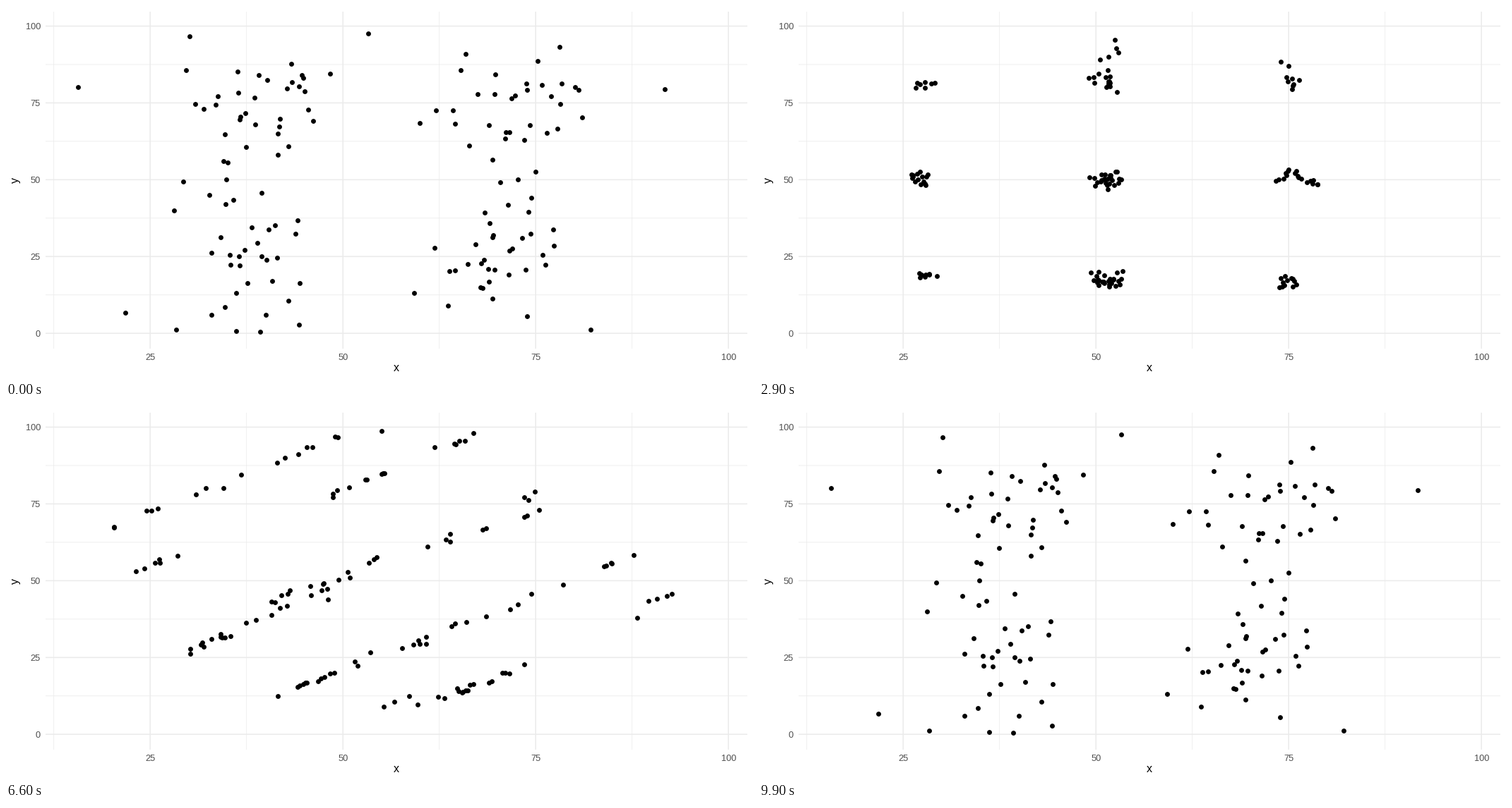
Write a matplotlib script that moves like this. It is 1058x529 px and loops after 10000 ms.

```python
import numpy as np
import matplotlib.pyplot as plt
from matplotlib.animation import FuncAnimation

W, H, DPI = 1058, 529, 100
FRAMES, INTERVAL = 100, 100
PX = 72 / DPI  # points per pixel
N = 142
CENTER = np.array([54.3, 47.8])

rng = np.random.default_rng(12)


def jitter(p, sx, sy):
    return p + rng.normal(size=p.shape).clip(-2, 2) * (sx, sy)


def nearest(v, levels):
    levels = np.asarray(levels)
    return levels[np.abs(v[:, None] - levels).argmin(1)]


def ellipse(cx, cy, rx, ry, angles):
    return np.c_[cx + rx * np.cos(angles), cy + ry * np.sin(angles)]


def spread(strokes, n):
    """n points evenly spaced along all strokes taken together."""
    strokes = [np.asarray(s, float) for s in strokes]
    a = np.vstack([s[:-1] for s in strokes])
    e = np.vstack([np.diff(s, axis=0) for s in strokes])
    size = np.hypot(e[:, 0], 0.6 * e[:, 1])
    ends = size.cumsum()
    s = (np.arange(n) + 0.5) / n * ends[-1]
    k = np.searchsorted(ends, s)
    return a[k] + e[k] * (1 - (ends[k] - s) / size[k])[:, None]


# The outline every other state is bent from.
OUTLINE = [
    [(55, 97), (43, 91), (35.6, 80), (26, 71), (22.3, 62), (24, 51)],
    [(26, 51), (40, 51.4), (56.7, 56), (61.8, 69)],
    [(57.4, 55), (48, 38), (35, 30), (30, 37), (38, 49)],
    [(30, 36), (30, 29), (36, 25), (44, 25.6), (55, 40.6), (68, 48), (71.5, 62), (69.5, 69.5)],
    [(58, 99.5), (68.5, 94), (83, 55), (98, 34)],
    [(56.7, 40.6), (64.4, 24)],
    [(74.4, 23), (63, 19), (45, 13.7)],
    [(48.7, 15), (56, 14)],
    [(52, 12.6), (46, 6)],
    [(50.5, 9.7), (78.2, 10.6)],
    [(68, 8.7), (68, 2.9)],
    ellipse(51.7, 81.5, 5, 4, np.linspace(0, 2 * np.pi, 13)),
]
base = spread(OUTLINE, N)
bx, by = base.T


def away():
    """Four loose clouds around an empty middle, with a few outliers."""
    far = [(15.6, 80.1), (91.7, 79.4), (21.8, 6.6), (82.1, 1.2),
           (30.1, 96.7), (53.3, 97.5), (78.1, 93.2)]
    p = list(far)
    while len(p) < N:
        sx, sy = (len(p) // 2 % 2) * 2 - 1, (len(p) % 2) * 2 - 1
        x, y = rng.normal(CENTER + (15.5 * sx, 24 * sy), (6.8, 12))
        clear = np.hypot((x - 56) / 14, (y - 48) / 17) > 1
        if clear and 28 < x < 81 and 0 < y < 91:
            p.append((x, y))
    return rng.permutation(np.array(p))


def rings(*radii):
    d = base - CENTER
    r = np.hypot(*d.T)
    goal = nearest(r, radii) + rng.uniform(-1.6, 1.6, N)
    return jitter(CENTER + d * (goal / r)[:, None], 0.5, 0.5)


def dots():
    y = nearest(by, [17.3, 50.5, 82]) + 2.1 * np.maximum(0, by - 93)
    return jitter(np.c_[nearest(bx, [26.8, 51.2, 75.7]), y], 0.6, 0.8)


def h_lines():
    return jitter(np.c_[bx, nearest(by, 10.5 + 19.9 * np.arange(5))], 1.5, 0.3)


def high_lines():
    mid = np.where(by > 50, 75, 25)
    return jitter(np.c_[bx, mid + 0.4 * (by - mid)], 1.8, 2)


def slant(sign):
    """Project onto five diagonals; sign +1 falls, -1 rises."""
    s = by + sign * bx
    levels = np.array([-50, -30, 0, 30, 50]) + (100 if sign > 0 else 0)
    move = (nearest(s, levels) - s) / 2
    along = rng.normal(0, 1.2, N)
    return jitter(np.c_[bx + sign * move + along, by + move - sign * along], 0.4, 0.4)


def star():
    """Nearest place on a five-pointed star, drawn out towards its tips."""
    turn = np.pi / 2 + np.arange(5) * 2 * np.pi / 5
    tips = ellipse(58, 50, 31.5, 42, turn)
    dents = ellipse(58, 50, 14, 19, turn + np.pi / 5)
    a = np.vstack([tips, tips])
    e = np.vstack([dents, np.roll(dents, 1, axis=0)]) - a
    t = (((base[:, None] - a) * e).sum(2) / (e * e).sum(1)).clip(0, 1)
    gap = base[:, None] - a - t[..., None] * e
    k = (gap ** 2).sum(2).argmin(1)
    t = t[np.arange(N), k] ** 1.7
    return jitter(a[k] + t[:, None] * e[k], 0.6, 1.5)


def v_lines():
    return jitter(np.c_[nearest(bx, 30.2 + 19.7 * np.arange(4)), by], 0.2, 2.5)


def wide_lines():
    x = np.where(bx < 50, 28 + 0.45 * (bx - 22), 65 + 0.25 * (bx - 50))
    return jitter(np.c_[x, by], 1, 2)


def x_shape():
    side = np.where(bx < CENTER[0], -1, 1)
    x = CENTER[0] + side * 0.54 * np.abs(by - CENTER[1])
    return jitter(np.c_[x, by], 1.5, 1.5)


states = [away(), rings(18, 37), rings(31), base, dots(), h_lines(), high_lines(),
          slant(1), slant(-1), star(), v_lines(), wide_lines(), x_shape()]
for s in states:
    s[:, 1] = s[:, 1].clip(0, 99.7)

# Frames per move; two still frames follow each one.
steps = np.array([6] * 6 + [5] + [6] * 3 + [5] * 3)
starts = 2 + np.r_[0, (steps + 2).cumsum()[:-1]]


def ease(t):
    return 4 * t**3 if t < 0.5 else 1 - 4 * (1 - t)**3


def positions(frame):
    k = np.searchsorted(starts, frame, side="right") - 1
    if k < 0:
        return states[0]
    a, b = states[k], states[(k + 1) % len(states)]
    t = min(1, (frame - starts[k] + 1) / steps[k])
    return a + (b - a) * ease(t)


plt.rcParams["font.family"] = "Liberation Sans"
fig = plt.figure(figsize=(W / DPI, H / DPI), dpi=DPI, facecolor="white")

LEFT, RIGHT, TOP, BOTTOM = 56, 1050, 8.2, 486
X0, XS, Y0, YS = -68.8, 10.92, 464.2, 4.357  # origin and pixels per unit

ax = fig.add_axes([LEFT / W, 1 - BOTTOM / H, (RIGHT - LEFT) / W, (BOTTOM - TOP) / H])
ax.set_xlim((LEFT - X0) / XS, (RIGHT - X0) / XS)
ax.set_ylim((Y0 - BOTTOM) / YS, (Y0 - TOP) / YS)
ax.axis("off")


def label(x, y, text, px, color="black", ha="center", va="baseline", **kw):
    fig.text(x / W, 1 - y / H, text, fontsize=px * PX, color=color, ha=ha, va=va, **kw)


for width, first in ((0.78, 12.5), (1.55, 0)):
    style = dict(color="#EBEBEB", lw=width * PX, snap=False, zorder=width)
    for v in np.arange(first, 101, 25):
        ax.axhline(v, **style)
        if v > 0:
            ax.axvline(v, **style)

for v in range(0, 101, 25):
    label(49, Y0 - v * YS + 4.6, str(v), 12.8, "#4D4D4D", ha="right")
    if v:
        label(X0 + v * XS, 502.5, str(v), 12.8, "#4D4D4D")
label(552.5, 517.5, "x", 16)
label(13, 247, "y", 16, va="center", rotation=90)

points, = ax.plot([], [], "o", color="black", ms=6.9 * PX, mew=0, zorder=3, clip_on=False)


def update(frame):
    points.set_data(*positions(frame).T)
    return points,


anim = FuncAnimation(fig, update, frames=FRAMES, interval=INTERVAL,
                     repeat=True, repeat_delay=0, blit=False)
plt.show()
```
